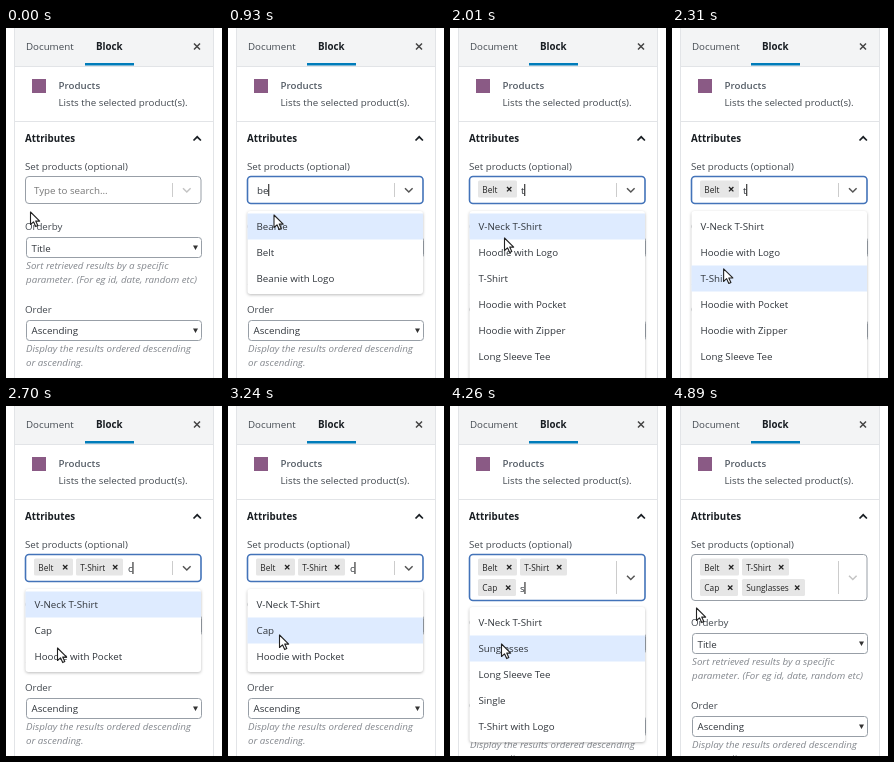
Recreate the animation shown at these times as an HTML page. Size 216 px wide and 350 px high, loop 5130 ms.

```html
<!DOCTYPE html>
<html lang="en">
<head>
<meta charset="utf-8">
<title>Block settings</title>
<style>
html, body { margin: 0; width: 100%; height: 100%; overflow: hidden; background: #fff; }
svg { display: block; width: 216px; height: 350px; }
text { font: 9.75px "Open Sans", "Noto Sans", sans-serif; fill: #30353b; white-space: pre; }
.bold { font-weight: 700; fill: #191e23; }
.medium { font-weight: 600; fill: #555d66; }
.soft { fill: #434950; }
.hint { fill: #777; }
.help { font-style: italic; fill: #85898f; }
.tag { font-size: 8.3px; fill: #222; }
.line { fill: none; stroke: #e2e4e7; }
.box { fill: #fff; stroke: #989fa7; }
.focus { stroke: #4373b9; stroke-width: 1.6; }
.menu { fill: #fff; filter: drop-shadow(0 1px 1.5px #0004); }
</style>
</head>
<body>
<svg viewBox="0 0 216 350">
  <rect x="8" width="200" height="38" fill="#f3f4f5"/>
  <path class="line" d="M8.5 0V350M207.5 0V350M8 38.5H208M8 93.5H208"/>
  <rect x="79" y="35" width="49" height="2.5" fill="#007cba"/>
  <text x="20" y="22" class="soft">Document</text>
  <text x="90" y="22" class="bold">Block</text>
  <path d="M188 15.5l6 6m0-6l-6 6" stroke="#444" stroke-width="1.5"/>
  <rect x="26" y="51" width="14" height="14" fill="#8a5a85"/>
  <text x="52.5" y="61" class="medium">Products</text>
  <text x="52.5" y="78" class="soft">Lists the selected product(s).</text>
  <text x="19" y="114" class="bold">Attributes</text>
  <path d="M187.5 112.5l3.7-3.7 3.7 3.7" fill="none" stroke="#191e23" stroke-width="1.7"/>
  <text x="19" y="141.5" class="soft">Set products (optional)</text>
  <g id="fields">
    <text x="19" y="202" class="soft">Orderby</text>
    <rect class="box" x="20.5" y="209.5" width="175" height="20" rx="3"/>
    <text x="25.5" y="223.5">Title</text>
    <text x="20" y="241" class="help">Sort retrieved results by a specific</text>
    <text x="20" y="255" class="help">parameter. (For eg id, date, random etc)</text>
    <text x="19" y="285" class="soft">Order</text>
    <rect class="box" x="20.5" y="292.5" width="175" height="20" rx="3"/>
    <text x="25.5" y="306">Ascending</text>
    <text x="20" y="324" class="help">Display the results ordered descending</text>
    <text x="20" y="338" class="help">or ascending.</text>
    <path d="M187 217.5h5l-2.5 4.5zM187 300.5h5l-2.5 4.5z" fill="#333"/>
  </g>
  <g id="picker"></g>
  <path id="caret" stroke="#111"/>
  <g id="menu"></g>
  <path id="cursor" d="M0 0V12.5L3 9.8 5.2 14.6 7.3 13.6 5.2 9.1H9.2Z" fill="#fff" stroke="#222" stroke-width="1.1" stroke-linejoin="round"/>
</svg>
<script>
const LOOP = 5130, FOCUS = 330, BLUR = 4830;
const $ = id => document.getElementById(id);

// cursor stops: time, x, y
const stops = [
  [0, 24.5, 184], [60, 24.5, 184], [420, 47, 162], [750, 47, 162], [930, 46, 187],
  [1110, 46, 216], [1560, 46, 216], [2010, 54.5, 210], [2100, 54.5, 213], [2340, 51.5, 242],
  [2700, 51.5, 242], [3030, 51.5, 229], [3900, 51.5, 229], [4110, 51.5, 238], [4440, 51.5, 238],
  [4860, 24.5, 202], [LOOP, 24.5, 202]
];

// each search: typed text, input position, and the tag it ends in
const searches = [
  { open: 600, pick: 1230, typed: 'be', x: 29, y: 166,
    options: ['Beanie', 'Belt', 'Beanie with Logo'],
    tag: { name: 'Belt', x: 28, y: 152.5, w: 39 } },
  { open: 1560, pick: 2340, typed: 't', x: 71, y: 166,
    options: ['V-Neck T-Shirt', 'Hoodie with Logo', 'T-Shirt', 'Hoodie with Pocket',
      'Hoodie with Zipper', 'Long Sleeve Tee', 'T-Shirt with Logo', 'Sunglasses'],
    tag: { name: 'T-Shirt', x: 70, y: 152.5, w: 47 } },
  { open: 2700, pick: 3270, typed: 'c', x: 122, y: 166,
    options: ['V-Neck T-Shirt', 'Cap', 'Hoodie with Pocket'],
    tag: { name: 'Cap', x: 28, y: 173, w: 38 } },
  { open: 3570, pick: 4290, typed: 's', x: 70, y: 186,
    options: ['V-Neck T-Shirt', 'Sunglasses', 'Long Sleeve Tee', 'Single', 'T-Shirt with Logo'],
    tag: { name: 'Sunglasses', x: 70, y: 173, w: 63 } },
  { open: LOOP, pick: LOOP, x: 138, y: 186 }
];

function cursorAt(t) {
  const i = stops.findIndex(s => s[0] > t);
  const [t0, x0, y0] = stops[i - 1], [t1, x1, y1] = stops[i];
  const u = (t - t0) / (t1 - t0), e = u * u * (3 - 2 * u);
  return [x0 + (x1 - x0) * e, y0 + (y1 - y0) * e];
}

const label = (x, y, s, cls = '') => `<text x="${x}" y="${y}" class="${cls}">${s}</text>`;

const drawTag = ({ name, x, y, w }) =>
  `<rect x="${x}" y="${y}" width="${w}" height="17" rx="1.5" fill="#e6e6e6"/>` +
  label(x + 4.3, y + 12, name, 'tag') +
  `<path d="M${x + w - 10} ${y + 6.5}l4.4 4.4m0-4.4l-4.4 4.4" stroke="#222" stroke-width="1.3"/>`;

function drawPicker(tags, focused, height, empty) {
  const mid = 148 + height / 2;
  return `<rect class="box ${focused ? 'focus' : ''}" x="19.5" y="148.5" width="175.5" height="${height - 1}" rx="3.5"/>` +
    `<path d="M166.5 155V${141 + height}" stroke="#ccc"/>` +
    `<path d="M177 ${mid - 1.8}l3.8 3.8 3.8-3.8" fill="none" stroke="${focused ? '#555' : '#c4c4c4'}" stroke-width="1.5"/>` +
    (empty ? label(28, 166, 'Type to search...', 'hint') : '') + tags.map(drawTag).join('');
}

function drawMenu(options, top, active) {
  const row = (s, i) => label(28.5, top + 19 + 26 * i, s);
  return `<rect class="menu" x="19.5" y="${top}" width="175.5" height="${options.length * 26 + 5}" rx="3"/>` +
    `<rect x="19.5" y="${top + 2.5 + 26 * active}" width="175.5" height="26" fill="#deebff"/>` +
    options.map(row).join('');
}

// the first option stays active until the pointer moves
function activeRow(opened, t, top) {
  const y = cursorAt(t)[1];
  const moved = stops.some(s => s[0] > opened && s[0] <= t) || Math.abs(y - cursorAt(opened)[1]) > 1;
  return moved ? Math.max(0, Math.floor((y - top - 2.5) / 26)) : 0;
}

function draw(t) {
  const done = searches.filter(s => t >= s.pick);
  const search = searches[done.length];
  const open = t >= search.open, focused = t >= FOCUS && t < BLUR;
  const extra = done.length > 2 ? 18 : 0;
  const [x, y] = cursorAt(t);

  $('fields').setAttribute('transform', `translate(0 ${extra})`);
  $('cursor').setAttribute('transform', `translate(${x} ${y})`);

  const typed = open ? search.typed.slice(0, 1 + Math.floor((t - search.open) / 150)) : '';
  $('picker').innerHTML =
    drawPicker(done.map(s => s.tag), focused, extra ? 47 : 28, !done.length && !open) +
    label(search.x, search.y, typed);
  const caretX = search.x + $('picker').lastChild.getComputedTextLength() + .3;
  $('caret').setAttribute('d', focused ? `M${caretX} ${search.y - 10}v12` : '');

  const top = 183 + extra;
  $('menu').innerHTML = open ? drawMenu(search.options, top, activeRow(search.open, t, top)) : '';
}

function tick() {
  draw(performance.now() % LOOP);
  requestAnimationFrame(tick);
}
tick();
</script>
</body>
</html>
```
